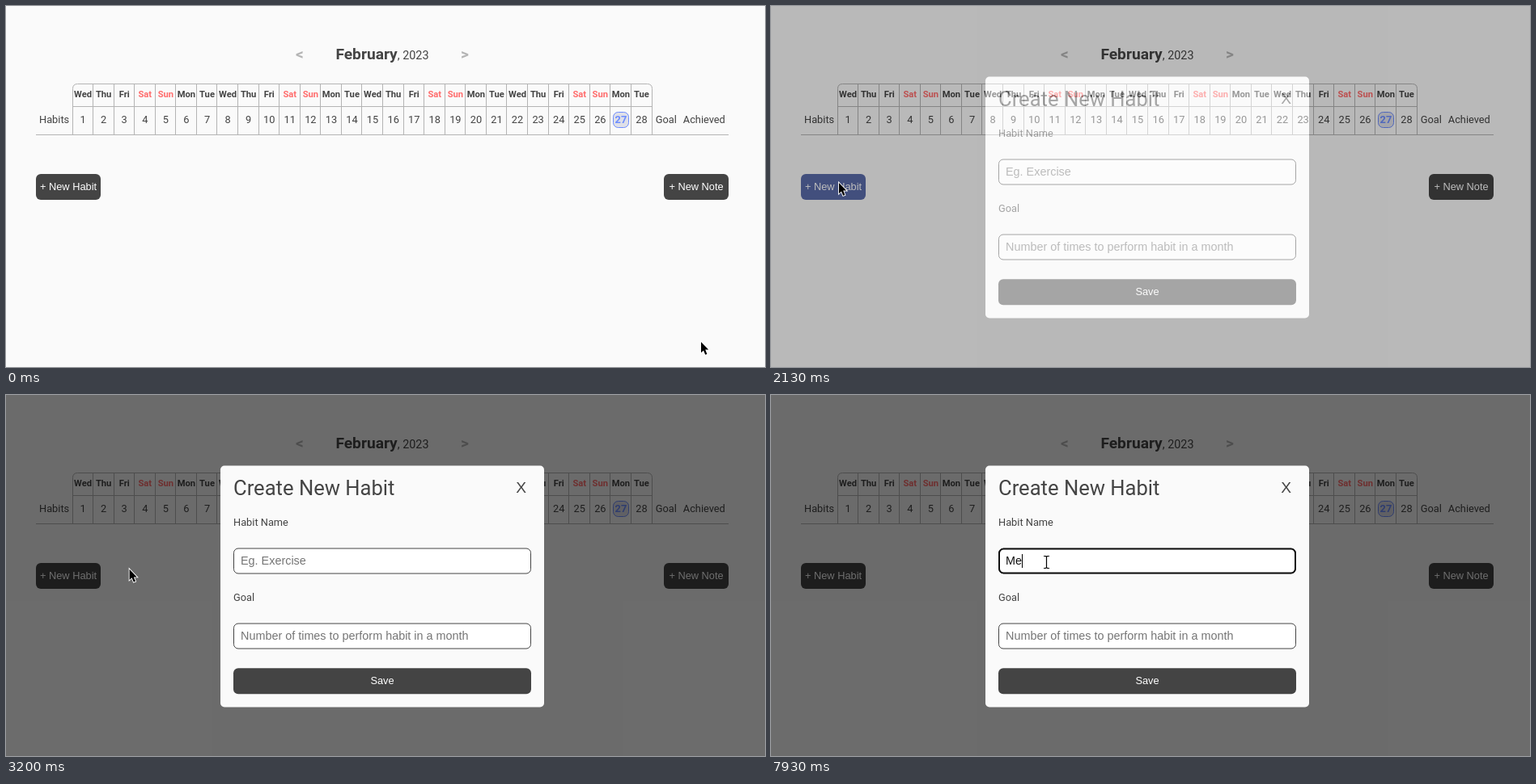
An HTML page that plays this animation: 938x447 px, repeating every 8000 ms.

```html
<!DOCTYPE html>
<html lang="en">
<head>
<meta charset="utf-8">
<title>Habit tracker</title>
<style>
html, body { margin: 0; width: 100%; height: 100%; overflow: hidden; background: #fafafa; }
svg { display: block; width: 100vw; height: 100vh; }
text { font-family: Roboto, sans-serif; font-size: 12.8px; fill: #444; }
.mid { text-anchor: middle; }
.day { font-size: 11.2px; font-weight: 700; }
.weekend { fill: #ff6c6c; }
.ui { font-family: "Liberation Sans", Arial, sans-serif; }
.field { font-size: 14.4px; }
.hint { fill: #757575; }
.light { fill: #fff; }
.item { font-family: "Open Sans", sans-serif; font-size: 12.2px; fill: #222; }
.nav { font-size: 19.2px; font-weight: 700; fill: #b4b4b4; }
.rule { fill: none; stroke: #b4b4b4; }
.box { fill: #fff; stroke: #444; }
</style>
</head>
<body>
<svg viewBox="0 0 938 447">
  <rect width="938" height="447" fill="#fafafa"/>
  <text class="nav mid" x="363" y="66">&lt;</text>
  <text class="nav mid" x="567" y="66">&gt;</text>
  <text x="407.4" y="66" font-weight="700" style="font-size:19.2px">February<tspan font-weight="400" style="font-size:14.4px">, 2023</tspan></text>
  <g id="calendar"></g>
  <text x="41" y="145">Habits</text>
  <text x="802.7" y="145">Goal</text>
  <text x="836.8" y="145">Achieved</text>
  <rect id="newHabit" x="37" y="208" width="80" height="32" rx="6"/>
  <text class="ui light mid" x="77" y="228">+ New Habit</text>
  <rect x="813" y="208" width="80" height="32" rx="6" fill="#444"/>
  <text class="ui light mid" x="853" y="228">+ New Note</text>

  <g id="dialog">
    <rect width="938" height="447" fill="#000" fill-opacity=".57"/>
    <rect x="265" y="87.5" width="400" height="299" rx="5" fill="#fafafa"/>
    <text x="281" y="124" style="font-size:25.6px">Create New Habit</text>
    <text class="ui" x="630.2" y="121" style="font-size:19.2px">X</text>
    <text x="281" y="162">Habit Name</text>
    <rect class="box" x="281.5" y="190" width="367" height="31" rx="5.5"/>
    <g id="focus" fill="none">
      <rect x="280.5" y="189" width="369" height="33" rx="7" stroke="#fff"/>
      <rect x="282" y="190.5" width="366" height="30" rx="5.5" stroke="#101010" stroke-width="2"/>
    </g>
    <text id="value" class="ui field" x="290" y="210"></text>
    <rect id="caret" y="197" width="1" height="17" fill="#000"/>
    <text x="281" y="255">Goal</text>
    <rect class="box" x="281.5" y="283" width="367" height="31" rx="5.5"/>
    <text class="ui field hint" x="290" y="303">Number of times to perform habit in a month</text>
    <rect x="281" y="338.3" width="368" height="32" rx="6" fill="#444"/>
    <text class="ui light mid" x="465" y="358">Save</text>
  </g>

  <g id="list">
    <path d="M380 455V234q0-3 3-3H392.500L401.500 222.500 410.500 231H449q3 0 3 3V455Z" fill="#fff" stroke="#000" stroke-opacity=".1"/>
  </g>
  <path id="arrow" d="M0 0V13.200L3 10.400 5.200 15.800 7.400 14.900 5.200 9.600H9.200Z" fill="#000" stroke="#fff" stroke-width="1.800" paint-order="stroke"/>
  <g id="beam" fill="none">
    <path d="M-3.500-7.500H-1L0-6.500 1-7.500H3.500M-3.500 7.500H-1L0 6.500 1 7.500H3.500M0-6.500V6.500" stroke="#000" stroke-width="1.200"/>
  </g>
</svg>
<script>
const $ = id => document.getElementById(id);
const clamp = v => Math.min(1, Math.max(0, v));
const progress = (t, from, to) => clamp((t - from) / (to - from));
const smooth = u => u * u * (3 - 2 * u);
const smoother = u => u * u * u * (u * (6 * u - 15) + 10);
const mix = (a, b, u) => a + (b - a) * u;
const show = (id, on) => $(id).setAttribute("visibility", on ? "visible" : "hidden");
const place = (id, x, y) => $(id).setAttribute("transform", `translate(${x} ${y})`);

function add(parent, tag, attrs, text = "") {
  const el = document.createElementNS("http://www.w3.org/2000/svg", tag);
  for (const key in attrs) el.setAttribute(key, attrs[key]);
  el.textContent = text;
  $(parent).append(el);
}

function buildCalendar() {
  const names = ["Wed", "Thu", "Fri", "Sat", "Sun", "Mon", "Tue"];
  const step = 25.57;
  let rules = "M82.5 159V102.500q0-6 6-6H792.500q6 0 6 6V159M82 124.500H798M37 159.500H893";
  for (let i = 1; i < 28; i++) rules += `M${Math.floor(82 + step * i) + 0.5} 97V159`;
  add("calendar", "path", { d: rules, class: "rule" });
  add("calendar", "rect", { x: 750.5, y: 131.5, width: 19, height: 19, rx: 6, fill: "#dfe0e8", stroke: "#6c8cff" });
  for (let i = 0; i < 28; i++) {
    const x = 82.3 + step * (i + 0.5);
    const name = names[i % 7];
    add("calendar", "text", { x, y: 113, class: "mid day" + (name[0] === "S" ? " weekend" : "") }, name);
    const today = i === 26 ? { style: "fill:#6c8cff;font-weight:700" } : {};
    add("calendar", "text", { x, y: 145, class: "mid", ...today }, i + 1);
  }
}

function buildList() {
  ["hab1", "hab2", "dfs", "hab3", "hab4", "sdfsdf"].forEach((word, i) =>
    add("list", "text", { x: 392, y: 258 + 36 * i, class: "item" }, word));
}

function drawPointer(t) {
  const a = smoother(progress(t, 0, 1060));
  const b = smooth(progress(t, 2870, 3840));
  const x = mix(mix(859, 84, a), 339.5, b) + (t >= 4270 ? 1 : 0);
  const y = mix(mix(416, 219, a), 207, b);
  const typing = b > 0 && x > 281;
  place("arrow", x, y);
  place("beam", Math.floor(x) + 0.5, y);
  show("arrow", !typing);
  show("beam", typing);
}

function drawButton(t) {
  const hover = progress(t, 870, 1130) * (1 - progress(t, 2070, 2200));
  $("newHabit").setAttribute("fill",
    `rgb(${mix(68, 108, hover)} ${mix(68, 140, hover)} ${mix(68, 255, hover)})`);
}

function drawDialog(t) {
  const u = progress(t, 2070, 2400);
  const opacity = t < 2130 ? 0 : 1 - Math.pow(1 - u, 3.1);
  $("dialog").setAttribute("opacity", opacity);
  const typed = "Me".slice(0, t < 7670 ? 0 : t < 7930 ? 1 : 2);
  const value = $("value");
  value.textContent = typed || "Eg. Exercise";
  value.style.fill = typed ? "#111" : "#757575";
  const focused = t >= 4200;
  show("focus", focused);
  show("caret", focused && (typed || Math.floor((t - 4200) / 531) % 2 === 0));
  $("caret").setAttribute("x", 290 + [0, 12, 20][typed.length]);
  $("list").setAttribute("opacity", focused ? 1 - progress(t, 7670, 7800) : 0);
}

function draw(now) {
  // The screen refreshes 15 times a second, on 10 ms ticks.
  const t = Math.round(Math.floor((now % 8000 + 3.4) * 0.015) / 0.15) * 10;
  drawPointer(t);
  drawButton(t);
  drawDialog(t);
}

function loop(now) {
  draw(now);
  requestAnimationFrame(loop);
}

buildCalendar();
buildList();
draw(0);
requestAnimationFrame(loop);
</script>
</body>
</html>
```
